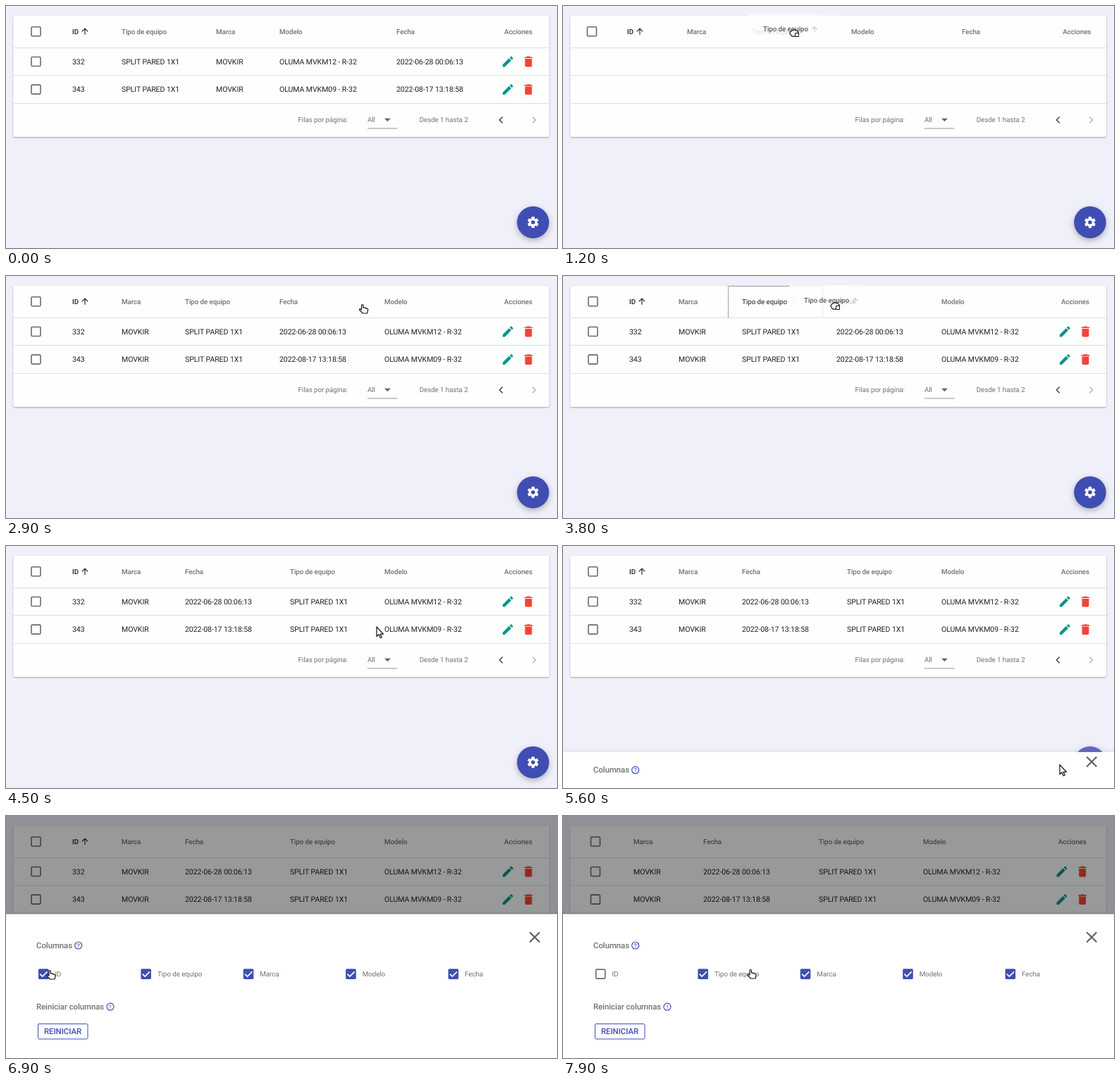
Animation, 782 px wide and 344 px high, one loop 8000 ms. Source, as an HTML page:

```html
<!DOCTYPE html>
<html lang="es">
<head>
<meta charset="utf-8">
<title>Tabla con columnas móviles</title>
<style>
html, body { margin: 0; width: 100%; height: 100%; overflow: hidden; background: #f0f0fa; }
svg { display: block; width: 782px; height: 344px; font-family: Roboto, Arial, sans-serif; text-rendering: geometricPrecision; }
</style>
</head>
<body>
<svg id="stage" viewBox="0 0 782 344"></svg>
<script>
const LOOP = 8000, STEP = 100;
const BLUE = '#3f4eb3', GREY = '#737373', DARK = '#212121';
const SMALL = 9.85, BODY = 10.6, TITLE = 11.5;
const stage = document.getElementById('stage');

// w: normal width, empty: width without rows, noId: width when ID is hidden
const COLS = {
  id: { label: 'ID', w: 70, empty: 85, noId: 0, arrow: 18, rows: ['332', '343'] },
  type: { label: 'Tipo de equipo', w: 134, empty: 141, noId: 148, arrow: 73, rows: ['SPLIT PARED 1X1', 'SPLIT PARED 1X1'] },
  brand: { label: 'Marca', w: 90, empty: 92, noId: 99, arrow: 37, rows: ['MOVKIR', 'MOVKIR'] },
  model: { label: 'Modelo', w: 166, empty: 157, noId: 186, arrow: 42, rows: ['OLUMA MVKM12 - R-32', 'OLUMA MVKM09 - R-32'] },
  date: { label: 'Fecha', w: 149, empty: 143, noId: 164, arrow: 35, rows: ['2022-06-28 00:06:13', '2022-08-17 13:18:58'] }
};
const DRAGS = [
  { col: 'type', swap: 'brand', start: 700, drop: 1200, dx: 44, dy: 5 },
  { col: 'model', swap: 'date', start: 2100, drop: 2500, dx: 58, dy: 3 },
  { col: 'type', swap: 'date', start: 3500, drop: 4000, dx: 44, dy: 7 }
];
const EMPTY_TIME = 200, OPEN = 5573, UNCHECK = 7000;

const PATH = [
  [400, 222, 72], [600, 208, 41], [700, 212, 41], [1200, 328, 38], [1400, 335, 42],
  [2000, 446, 39], [2100, 510, 50], [2200, 586, 61], [2500, 602, 42], [2800, 560, 48],
  [3300, 298, 43], [3500, 302, 43], [3800, 386, 42], [4000, 420, 41], [4300, 440, 46],
  [4700, 620, 200], [5200, 747, 310], [5400, 745, 311], [5600, 709, 319]
];
const PANEL_PATH = [
  [6600, 230, 270], [6900, 64, 226], [7400, 64, 226], [7600, 300, 256], [7900, 268, 225]
];

const ICONS = {
  edit: 'M3 17.25V21h3.75L17.81 9.94l-3.75-3.75L3 17.25zM20.71 7.04c.39-.39.39-1.02 0-1.41l-2.34-2.34c-.39-.39-1.02-.39-1.41 0l-1.83 1.83 3.75 3.75 1.83-1.83z',
  trash: 'M6 19c0 1.1.9 2 2 2h8c1.1 0 2-.9 2-2V7H6v12zM19 4h-3.5l-1-1h-5l-1 1H5v2h14V4z',
  up: 'M4 12l1.41 1.41L11 7.83V20h2V7.83l5.58 5.59L20 12l-8-8-8 8z',
  left: 'M15.41 7.41L14 6l-6 6 6 6 1.41-1.41L10.83 12z',
  right: 'M8.59 16.59L10 18l6-6-6-6-1.41 1.41L13.17 12z'
};

const icon = (name, x, y, scale, fill) =>
  `<path d="${ICONS[name]}" fill="${fill}" transform="translate(${x} ${y}) scale(${scale}) translate(-12 -12)"/>`;
const text = (s, x, cy, size, fill, weight = 400) =>
  `<text x="${x}" y="${cy + size * 0.355}" font-size="${size}" fill="${fill}" font-weight="${weight}" letter-spacing="-.01em">${s}</text>`;
const rect = (x, y, w, h, attrs) => `<rect x="${x}" y="${y}" width="${w}" height="${h}" ${attrs}/>`;
const line = (d, color, width = 1, extra = '') =>
  `<path d="${d}" fill="none" stroke="${color}" stroke-width="${width}" ${extra}/>`;

function box(x, y, checked) {
  if (!checked) return rect(x - 6.5, y - 6.5, 13, 13, 'rx="1.3" fill="none" stroke="#6b6b6b" stroke-width="1.6"');
  return rect(x - 7.3, y - 7.3, 14.6, 14.6, `rx="1.6" fill="${BLUE}"`) +
    line(`M${x - 5} ${y}l3.5 3.5 6.7-6.8`, '#fff', 1.7);
}

function pathAt(points, t) {
  if (t < points[0][0]) return null;
  for (let i = 1; i < points.length; i++) {
    const [t0, x0, y0] = points[i - 1], [t1, x1, y1] = points[i];
    if (t <= t1) {
      const k = (t - t0) / (t1 - t0);
      return { x: x0 + (x1 - x0) * k, y: y0 + (y1 - y0) * k };
    }
  }
  return null;
}

function tableState(t) {
  const order = ['id', 'type', 'brand', 'model', 'date'];
  let empty = false;
  for (const d of DRAGS) {
    if (t < d.drop) break;
    const a = order.indexOf(d.col), b = order.indexOf(d.swap);
    [order[a], order[b]] = [order[b], order[a]];
    if (t < d.drop + EMPTY_TIME) empty = true;
  }
  const noId = t >= UNCHECK;
  if (noId) order.shift();
  return { order, empty, noId, drag: DRAGS.find(d => t >= d.start && t <= d.drop) };
}

function table({ order, empty, noId, drag }) {
  const checkX = empty ? 41 : noId ? 46 : 42.5;
  const shift = empty ? 2.3 : noId ? -4.3 : 0;
  const size = empty ? 'empty' : noId ? 'noId' : 'w';
  let s = rect(10.5, 14, 760.5, 172, 'rx="2" fill="#fdfefe" filter="url(#low)"');
  for (const y of [59.5, 98.5, 138.5]) s += line(`M10.5 ${y}H771`, '#dedfdf');
  s += box(checkX, 36.3, false);
  let x = empty ? 91 : noId ? 100 : 94;
  for (const key of order) {
    const c = COLS[key], held = drag && drag.col === key;
    const color = key === 'id' ? DARK : held && !empty ? '#4a4a4a' : GREY;
    s += text(c.label, x, held ? 37 : 36.3, SMALL, color, 500);
    if (key === 'id') s += icon('up', x + c.arrow, 36, 0.58, DARK);
    if (held && !empty) {
      s += icon('up', x + c.arrow, 36, 0.52, '#c4c4c4');
      s += line(`M${x - 19.5} 59V14M${x - 20} 14.5h${c.w}M${x + c.w - 19.5} 14V59`, '#444', 1, 'stroke-dasharray="1 1"');
    }
    if (!empty) c.rows.forEach((v, i) => { s += text(v, x, 79 + i * 39.6, BODY, DARK); });
    x += c[size];
  }
  s += text('Acciones', 707 + shift, 36.3, SMALL, GREY, 500);
  if (!empty) for (const y of [79, 118.6]) {
    s += box(checkX, y, false) + icon('edit', 712.3 + shift, y, 0.82, '#009688') +
      icon('trash', 741.5 + shift, y, 0.82, '#f44336');
  }
  return s + text('Filas por página:', 414.5, 162, SMALL, GREY) + text('All', 513, 161.5, SMALL, GREY) +
    '<path d="M537 159.7h9l-4.5 4.5z" fill="#666"/>' + line('M513 174H555.5', '#949494') +
    text('Desde 1 hasta 2', 586.7, 162, SMALL, GREY) +
    icon('left', 702.5, 162, 0.82, '#555') + icon('right', 749.5, 162, 0.82, '#bdbdbd');
}

function fab(t) {
  let teeth = '';
  for (let i = 0; i < 6; i++) teeth += rect(-2.2, -8, 4.4, 5, `rx=".8" transform="rotate(${i * 60})"`);
  return `<circle cx="748" cy="307.5" r="22.8" fill="${t >= 5400 ? '#6469c0' : BLUE}" filter="url(#high)"/>` +
    `<g transform="translate(748 307.5)" fill="#fff">${teeth}<circle r="5.9"/><circle r="2.8" fill="${BLUE}"/></g>`;
}

function infoIcon(x, y, mark) {
  return `<circle cx="${x}" cy="${y}" r="5" fill="none" stroke="${BLUE}" stroke-width="1.2"/>` +
    `<text x="${x}" y="${y + 2.9}" font-size="8" font-weight="500" text-anchor="middle" fill="${BLUE}">${mark}</text>`;
}

function panel(t) {
  const p = Math.min(1, (t - OPEN) / 200);
  if (p < 0) return '';
  const k = (1 - p) ** 2 * 1.336;
  const shade = 0.4 * Math.max(0, Math.min(1, (t - 5600) / 200));
  let s = rect(0, 0, 782, 344, `fill="#000" opacity="${shade}"`) +
    rect(-20, 139.5 + 153.5 * k, 822, 240, 'fill="#fff" filter="url(#high)"') +
    `<g transform="translate(0 ${134.5 * k})">` +
    text('Columnas', 43, 183.5, TITLE, GREY, 500) + infoIcon(102.7, 184, '?') +
    line('M743.3 165.3l14 14m0-14l-14 14', '#616161', 2.2);
  ['id', 'type', 'brand', 'model', 'date'].forEach((key, i) => {
    const x = 53.3 + i * 145.4;
    s += box(x, 224.6, key !== 'id' || t < UNCHECK) + text(COLS[key].label, x + 16.2, 224.5, SMALL, GREY);
  });
  return s + text('Reiniciar columnas', 43, 270.8, TITLE, GREY, 500) + infoIcon(148, 271.2, '!') +
    rect(45.5, 295.5, 70.5, 21.5, `rx="1.5" fill="#fff" stroke="${BLUE}"`) +
    text('REINICIAR', 54, 306.3, TITLE, BLUE, 500) + '</g>';
}

function ghost(drag, pos) {
  const c = COLS[drag.col], x = pos.x - drag.dx, y = pos.y - drag.dy;
  return rect(x - 20, y - 22, c.w + 1, 46, 'fill="url(#fade)"') +
    text(c.label, x, y, SMALL, '#5c5c5c', 500) + icon('up', x + c.arrow, y, 0.52, '#c4c4c4');
}

function cursor(pos, t, drag) {
  const overHead = t < OPEN && pos.y < 59 && pos.y > 14;
  const overBox = t > OPEN && Math.abs(pos.y - 225) < 9;
  const overFab = t < OPEN && Math.hypot(pos.x - 748, pos.y - 307.5) < 23;
  let d = 'M-4-8V5.5l3-2.8 2.3 5 2-.9L1.2 2.2H5.5z', extra = '';
  if (drag) {
    d = 'M-4.5-1.5q.2-1.8 1.8-1.4q1-2 2.6-.8q1.8-1 2.8.6q2-.4 2.2 1.4q1.6.2 1.4 2l-.9 3.6q-.4 1.3-1.6 1.3h-6q-1.2 0-1.8-1.2l-1.8-2.6q-.8-2 1.3-2.9z';
    if (pos.y < 59) extra = rect(1.5, 0.5, 5, 5, 'fill="#fff" stroke="#111"');
  } else if (overHead || overBox || overFab) {
    d = 'M-3 1V-5q0-1.5 1.2-1.5T-.6-5V-2q2-.6 2.5.5q1.9-.4 2.3.8q2-.3 1.9 1.7L5.2 6H-1.5L-6 1.2q-.2-1.8 1.5-1.1z';
  }
  return `<g transform="translate(${pos.x} ${pos.y})" stroke-linejoin="round">` +
    `<path d="${d}" fill="#fff" stroke="#111" stroke-width="1.2"/>${extra}</g>`;
}

const DEFS = `<defs>
  <filter id="low" x="-5%" y="-10%" width="110%" height="125%">
    <feDropShadow dx="0" dy="1" stdDeviation=".8" flood-color="#2f3a2a" flood-opacity=".42"/></filter>
  <filter id="high" x="-40%" y="-40%" width="180%" height="190%">
    <feDropShadow dx="0" dy="3" stdDeviation="4" flood-color="#000" flood-opacity=".28"/></filter>
  <linearGradient id="fade"><stop offset="0" stop-color="#fdfefe" stop-opacity=".86"/>
    <stop offset=".6" stop-color="#fdfefe" stop-opacity=".72"/>
    <stop offset="1" stop-color="#fdfefe" stop-opacity=".2"/></linearGradient>
</defs>`;

function draw(t) {
  const state = tableState(t);
  const pos = pathAt(t < 5700 ? PATH : PANEL_PATH, t);
  stage.innerHTML = DEFS + rect(0, 0, 782, 344, 'fill="#f0f0fa"') + table(state) + fab(t) + panel(t) +
    (state.drag ? ghost(state.drag, pos) : '') + (pos ? cursor(pos, t, state.drag) : '');
}

let shown = -1;
function tick() {
  const t = Math.floor(performance.now() % LOOP / STEP) * STEP;
  if (t !== shown) draw(shown = t);
  requestAnimationFrame(tick);
}
tick();
</script>
</body>
</html>
```
